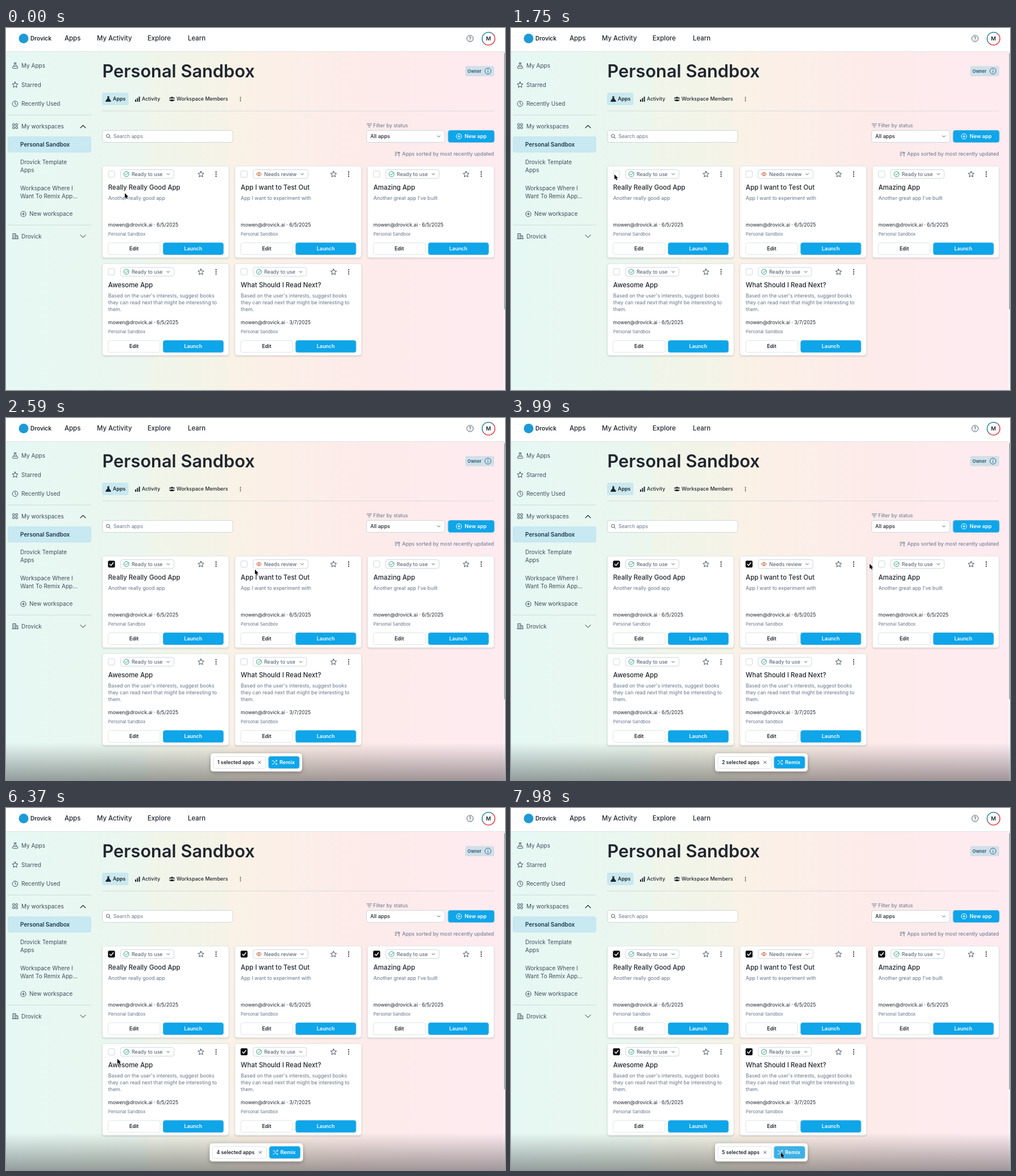
Recreate the animation shown at these times as an HTML page. Size 878 px wide and 638 px high, loop 8000 ms.

```html
<!DOCTYPE html>
<html lang="en">
<head>
<meta charset="utf-8">
<title>App workspace</title>
<style>
html, body { margin: 0; width: 100%; height: 100%; overflow: hidden; }
svg { display: block; width: 100vw; height: 100vh; }
text { font-family: Inter, "Noto Sans", sans-serif; font-optical-sizing: none; white-space: pre; }
</style>
</head>
<body>
<svg id="stage" viewBox="0 0 878 638">
  <defs>
    <linearGradient id="page">
      <stop offset="0" stop-color="#e6f8f4"/><stop offset=".281" stop-color="#ebf6ee"/>
      <stop offset=".281" stop-color="#f0f5ea"/><stop offset=".444" stop-color="#f5f3e7"/>
      <stop offset=".444" stop-color="#faf2e6"/><stop offset=".71" stop-color="#fdebea"/>
      <stop offset="1" stop-color="#fdebf1"/>
    </linearGradient>
    <linearGradient id="shade" x2="0" y2="1">
      <stop offset="0" stop-opacity="0"/><stop offset="1" stop-opacity=".36"/>
    </linearGradient>
    <linearGradient id="ring" x2="1" y2="1">
      <stop offset="0" stop-color="#2fa36b"/><stop offset=".35" stop-color="#2b7fc0"/>
      <stop offset=".6" stop-color="#e0453f"/><stop offset="1" stop-color="#d8364a"/>
    </linearGradient>
    <filter id="soft" x="-10%" y="-10%" width="120%" height="130%">
      <feDropShadow dx="0" dy="1.2" stdDeviation="1.3" flood-opacity=".2"/>
    </filter>
    <filter id="lift" x="-15%" y="-50%" width="130%" height="220%">
      <feDropShadow dx="0" dy="2" stdDeviation="3.5" flood-opacity=".28"/>
    </filter>
  </defs>
  <g id="scene"></g>
  <g id="overlay" opacity="0">
    <rect y="572" width="878" height="66" fill="url(#shade)"/>
    <g id="toolbar"></g>
  </g>
  <path id="cursor" d="M0 0V8.8L2 7 3.5 10.2 5 9.5 3.6 6.4H6.3Z" fill="#000" stroke="#fff" stroke-width=".9" paint-order="stroke"/>
</svg>
<script>
const INK = '#20262e', SLATE = '#3f4f5c', GREY = '#64748b', BLUE = '#0ea5e9', LINE = '#cfd6da';
const BRAND = 'Drovick', EMAIL = 'mowen@drovick.ai', SPACE = 'Personal Sandbox';
const $ = id => document.getElementById(id);

// Drawing helpers; all return SVG markup.
const text = (x, y, size, str, color = INK, weight = 400, anchor = 'start') =>
  `<text x="${x}" y="${y}" font-size="${size}" fill="${color}" font-weight="${weight}" text-anchor="${anchor}">${str}</text>`;
const box = (x, y, w, h, fill, stroke = 'none', r = 3.5, extra = '') =>
  `<rect x="${x}" y="${y}" width="${w}" height="${h}" rx="${r}" fill="${fill}" stroke="${stroke}" ${extra}/>`;
const button = (x, y, w, fill = BLUE) => box(x + .5, y + .5, w - 1, 21, fill, '#52b3df');
const line = (d, color = SLATE, width = 1) =>
  `<path d="${d}" fill="none" stroke="${color}" stroke-width="${width}" stroke-linecap="round" stroke-linejoin="round"/>`;
const solid = (d, color = INK) => `<path d="${d}" fill="${color}"/>`;
const ring = (x, y, r, color = SLATE, width = 1) =>
  `<circle cx="${x}" cy="${y}" r="${r}" fill="none" stroke="${color}" stroke-width="${width}"/>`;
const dot = (x, y, r, color = INK) => `<circle cx="${x}" cy="${y}" r="${r}" fill="${color}"/>`;
const dots = (x, y, gap, r) => [-gap, 0, gap].map(d => dot(x, y + d, r)).join('');
const chevron = (x, y, w, h, color) => line(`M${x - w} ${y - h / 2}l${w} ${h} ${w} ${-h}`, color);
const plus = (x, y, color) => ring(x, y, 4.7, color) + line(`M${x - 2.2} ${y}h4.4M${x} ${y - 2.2}v4.4`, color);
const star = (x, y, r, color) => line('M' + Array.from({ length: 10 }, (_, i) => {
  const a = i * Math.PI / 5, q = i % 2 ? r * .47 : r;
  return `${(x + q * Math.sin(a)).toFixed(2)} ${(y - q * Math.cos(a)).toFixed(2)}`;
}).join('L') + 'Z', color);

function header() {
  const nav = [[103, 'Apps'], [160, 'My Activity'], [249, 'Explore'], [320, 'Learn']];
  return box(0, 0, 878, 41, '#fff', 'none', 0) + box(0, 41, 878, 1, '#dde3e3', 'none', 0) +
    dot(31, 18.5, 8.5, '#1e9ad6') + text(43, 22, 10, BRAND, INK, 600) +
    nav.map(([x, s]) => text(x, 22, 11.4, s, INK, 500)).join('') +
    ring(816.5, 18.5, 5.6) + text(816.5, 21.6, 8.5, '?', SLATE, 500, 'middle') +
    ring(849, 18.7, 11.3, 'url(#ring)', 1.5) + text(849, 22.2, 9.6, 'M', INK, 600, 'middle');
}

function sidebar() {
  const item = (x, y, s, weight = 400, color = SLATE) => text(x, y + 3.6, 10, s, color, weight);
  const squares = [[11.7, 168.7], [17, 168.7], [11.7, 174], [17, 174]];
  return line('M14.2 61.5h3.8M15 61.5v3.3l-3.6 4.4q-.5 1.8 1 1.8h7.4q1.5 0 1-1.8l-3.6-4.4v-3.3M13.5 67.3h5') +
    item(27, 66, 'My Apps') +
    star(16, 100.3, 5.3, SLATE) + item(27, 100, 'Starred') +
    ring(16, 133.5, 4.8) + line('M16 130.5v3.3l2 1.2') + item(27, 133.5, 'Recently Used') +
    box(3, 152.8, 147, 1, '#cddcd9', 'none', 0) +
    squares.map(([x, y]) => box(x, y, 3.4, 3.4, 'none', SLATE, .6)).join('') +
    item(27, 173, 'My workspaces') + line('M131 176l4.5-4.5 4.5 4.5', INK, 1.1) +
    box(3, 191, 147, 28.5, '#c8e8f2') + item(25, 205, SPACE, 600, '#1d3b4c') +
    item(25, 236.5, BRAND + ' Template') + item(25, 250.8, 'Apps') +
    item(25, 282, 'Workspace Where I') + item(25, 296.3, 'Want To Remix App...') +
    plus(30.5, 327.8, SLATE) + item(41, 327.8, 'New workspace') +
    box(3, 346.8, 147, 1, '#cddcd9', 'none', 0) +
    line('M12 371.5v-9h5v9M17 366h3.8v5.5M11 371.5h10.5M14 365h1M14 367.2h1M14 369.4h1M18.8 368.6h.4') +
    item(27, 367, BRAND) + chevron(135.5, 367, 4.5, 4.5, INK);
}

function pageTop() {
  return text(169.5, 86.5, 30.75, SPACE, INK, 600) +
    box(808, 67, 51, 18, '#d2dfe7') + text(812, 78.8, 7.7, 'Owner', '#1f5673', 600) +
    ring(848, 76, 5.3, '#1f6f99') + line('M848 75.5v2.8M848 73.3v.1', '#1f6f99', 1.1) +
    box(169, 114, 46.5, 22, '#c9e8ef') +
    solid('M178 120.5h4v1h-.6v2.3l3.4 4.6q.5 1.6-1 1.6h-7.6q-1.5 0-1-1.6l3.4-4.6v-2.3H178Z') +
    text(188, 128.3, 8.9, 'Apps', INK, 600) +
    solid('M227 126h2v4h-2zM230.3 123.5h2v6.5h-2zM233.6 121h2v9h-2z') +
    text(239, 128.3, 8.9, 'Activity', INK, 500) +
    dot(292, 122.8, 1.9) + dot(288.7, 123.5, 1.3) + dot(295.3, 123.5, 1.3) +
    solid('M288.5 129q0-3.2 3.5-3.2t3.5 3.2zM287 128q0-2.2 2-2.2l-1.2 2.2zM297 128q0-2.2-2-2.2l1.2 2.2z') +
    text(300, 128.3, 8.9, 'Workspace Members', INK, 500) + dots(412.5, 125.3, 3, .9) +
    box(169, 145.7, 690, 1, '#d8dcd9', 'none', 0) +
    box(169.5, 180.5, 229.5, 21, '#fff', LINE) + ring(179.4, 190.2, 2.8) + line('M181.6 192.4l2.2 2.2') +
    text(189, 194, 8.8, 'Search apps', GREY) +
    line('M635 169h8.5M636.5 171.7h5.5M638.2 174.4h2', GREY) +
    text(646, 174.7, 8.8, 'Filter by status', GREY) +
    box(634.5, 180.5, 137.5, 21, '#fff', LINE) + text(641, 194, 9.1, 'All apps', INK, 500) +
    chevron(761.5, 191, 2.3, 2.3, SLATE) +
    button(777.5, 180, 82) + plus(797, 191, '#fff') + text(807, 194.2, 9.1, 'New app', '#fff', 600) +
    line('M684.5 219h5.5M684.5 221.7h4M684.5 224.4h2.5M691.5 226v-7M689.7 220.6l1.8-1.9 1.8 1.9', GREY) +
    text(697, 225.3, 8.95, 'Apps sorted by most recently updated', GREY);
}

const READING = ["Based on the user's interests, suggest books", 'they can read next that might be interesting to', 'them.'];
const cards = [
  { title: 'Really Really Good App', about: ['Another really good app'], date: '6/5/2025' },
  { title: 'App I want to Test Out', about: ['App I want to experiment with'], date: '6/5/2025', review: true },
  { title: 'Amazing App', about: ["Another great app I've built"], date: '6/5/2025' },
  { title: 'Awesome App', about: READING, date: '6/5/2025' },
  { title: 'What Should I Read Next?', about: READING, date: '3/7/2025' },
];

function card({ title, about, date, review }, i) {
  const x = 169.3 + i % 3 * 233.3, y = 243 + Math.floor(i / 3) * 172.2, chip = review ? 96.5 : 94;
  const status = review
    ? line('M38 14.5q4.5-6.5 9 0q-4.5 6.5-9 0Z', '#c2562d') + ring(42.5, 14.5, 1.4, '#c2562d')
    : ring(42.5, 14.5, 4.5, '#2c9a7a') + line('M40.5 14.6l1.5 1.5 4-4.3', '#2c9a7a');
  return `<g transform="translate(${x} ${y})">` +
    box(.3, .3, 222.4, 161.4, '#fff', '#dde2e4', 4, 'stroke-width=".8" filter="url(#soft)"') +
    box(10.7, 8.9, 11.2, 11.2, '#fff', LINE, 2) +
    `<g id="check${i}" visibility="hidden">${box(10.2, 8.4, 12.2, 12.2, '#0b0d10', 'none', 2) +
      line('M13.3 14.7l2.2 2.3 4-5', '#fff', 1.4)}</g>` +
    box(32.3, 6.7, chip, 15.4, '#fff', LINE) + status +
    text(51.7, 17.7, 8.9, review ? 'Needs review' : 'Ready to use', '#475569') +
    chevron(chip + 22, 14.7, 2.2, 2.2, SLATE) + star(173.7, 14.9, 5.5, SLATE) + dots(200.3, 14.6, 3.7, 1.1) +
    text(10.5, 41.7, 11.45, title, INK, 500) +
    about.map((s, k) => text(10.5, 60 + k * 12.1, 8.8, s, GREY)).join('') +
    text(10.5, 107, 8.7, `${EMAIL} · ${date}`, INK) + text(10.5, 123.2, 7.7, SPACE, GREY) +
    box(10.4, 135.5, 91.4, 21, '#fff', '#dfe4e7') + text(56, 149.2, 8.9, 'Edit', INK, 600, 'middle') +
    button(106.7, 135, 107) + text(160, 149.2, 8.9, 'Launch', '#fff', 600, 'middle') + '</g>';
}

function selectionBar(count, hover) {
  const half = [80.5, 81.5, 81.5, 82, 81.5][count - 1], left = 440.5 - half, right = 440.5 + half, b = right - 59.5;
  return box(left, 591, half * 2, 32, '#fff', 'none', 5, 'filter="url(#lift)"') +
    box(left + 5, 596.5, half * 2 - 69, 21, '#fff', '#dfe4e7') +
    text(left + 12, 609.8, 8.7, `${count} selected apps`, INK, 600) +
    line(`M${right - 77.2} 604.7l4.4 4.4m0-4.4l-4.4 4.4`, SLATE, .9) +
    button(b, 596, 55, hover ? '#3db1e6' : BLUE) +
    line(`M${b + 7} 604h1.8l4.4 6h2M${b + 7} 610h1.8l1.2-1.6M${b + 11.8} 605.5l1.4-1.5h2` +
      `M${b + 14} 602.5l1.5 1.5-1.5 1.5M${b + 14} 608.5l1.5 1.5-1.5 1.5`, '#fff', .9) +
    text(b + 19.8, 610, 9.1, 'Remix', '#fff', 600);
}

$('scene').innerHTML = box(0, 0, 878, 638, 'url(#page)', 'none', 0) + header() + sidebar() + pageTop() +
  cards.map(card).join('') + box(875, 42, 3, 596, '#fbf5f7', 'none', 0) + box(876.4, 44, 1.6, 452, '#a0a3a6', 'none', .8);

const LOOP = 8000, STEP = 70;
const clicks = [[1820, 0], [3360, 1], [4690, 2], [5600, 4], [6790, 3]]; // time, card
const path = [ // time, x, y
  [0, 209, 291], [70, 209, 291], [700, 184, 262], [980, 182, 260], [1330, 182, 260], [1400, 182, 258],
  [1890, 182, 258], [2450, 391, 264], [2590, 438, 267], [2660, 446, 268], [2800, 446, 268], [3220, 416, 258],
  [3360, 416, 258], [3710, 609, 262], [3780, 609, 262], [3990, 631, 257], [4200, 637, 262], [4270, 637, 262],
  [4550, 652, 257], [4690, 652, 257], [4970, 471, 422], [5250, 418, 430], [5460, 416, 431], [5670, 416, 431],
  [6300, 200, 440], [6370, 196, 442], [6580, 184, 431], [7000, 184, 431], [7490, 440, 600], [7630, 478, 622],
  [7840, 473, 606], [7910, 473, 606], [7980, 475, 607],
];

// Monotone cubic: passes smoothly through moving points, rests at stops.
const slope = (i, axis) => (path[i + 1][axis] - path[i][axis]) / (path[i + 1][0] - path[i][0]);
function tangent(i, axis) {
  if (i === 0 || i === path.length - 1) return 0;
  const a = slope(i - 1, axis), b = slope(i, axis);
  return a * b > 0 ? 2 * a * b / (a + b) : 0;
}
function position(t, axis) {
  const next = path.findIndex(p => p[0] > t);
  if (next < 0) return path[path.length - 1][axis];
  const i = next - 1, span = path[next][0] - path[i][0], u = (t - path[i][0]) / span, v = 1 - u;
  return path[i][axis] * v * v * (1 + 2 * u) + path[next][axis] * u * u * (1 + 2 * v) +
    span * u * v * (v * tangent(i, axis) - u * tangent(next, axis));
}

let shown = '';
function draw(now) {
  const t = Math.floor(now % LOOP / STEP) * STEP;
  const x = position(t, 1), y = position(t, 2);
  const count = clicks.filter(([time]) => t >= time).length;
  const hover = x > 462 && x < 517 && y > 596 && y < 618;
  clicks.forEach(([time, i]) => $('check' + i).setAttribute('visibility', t >= time ? 'visible' : 'hidden'));
  $('overlay').setAttribute('opacity', Math.min(1, Math.max(0, (t - 1820) / 210)));
  $('cursor').setAttribute('transform', `translate(${x} ${y})`);
  const state = `${count} ${hover}`;
  if (state !== shown) {
    $('toolbar').innerHTML = count ? selectionBar(count, hover) : '';
    shown = state;
  }
}

const start = performance.now();
function tick() {
  draw(performance.now() - start);
  requestAnimationFrame(tick);
}
tick();
</script>
</body>
</html>
```
